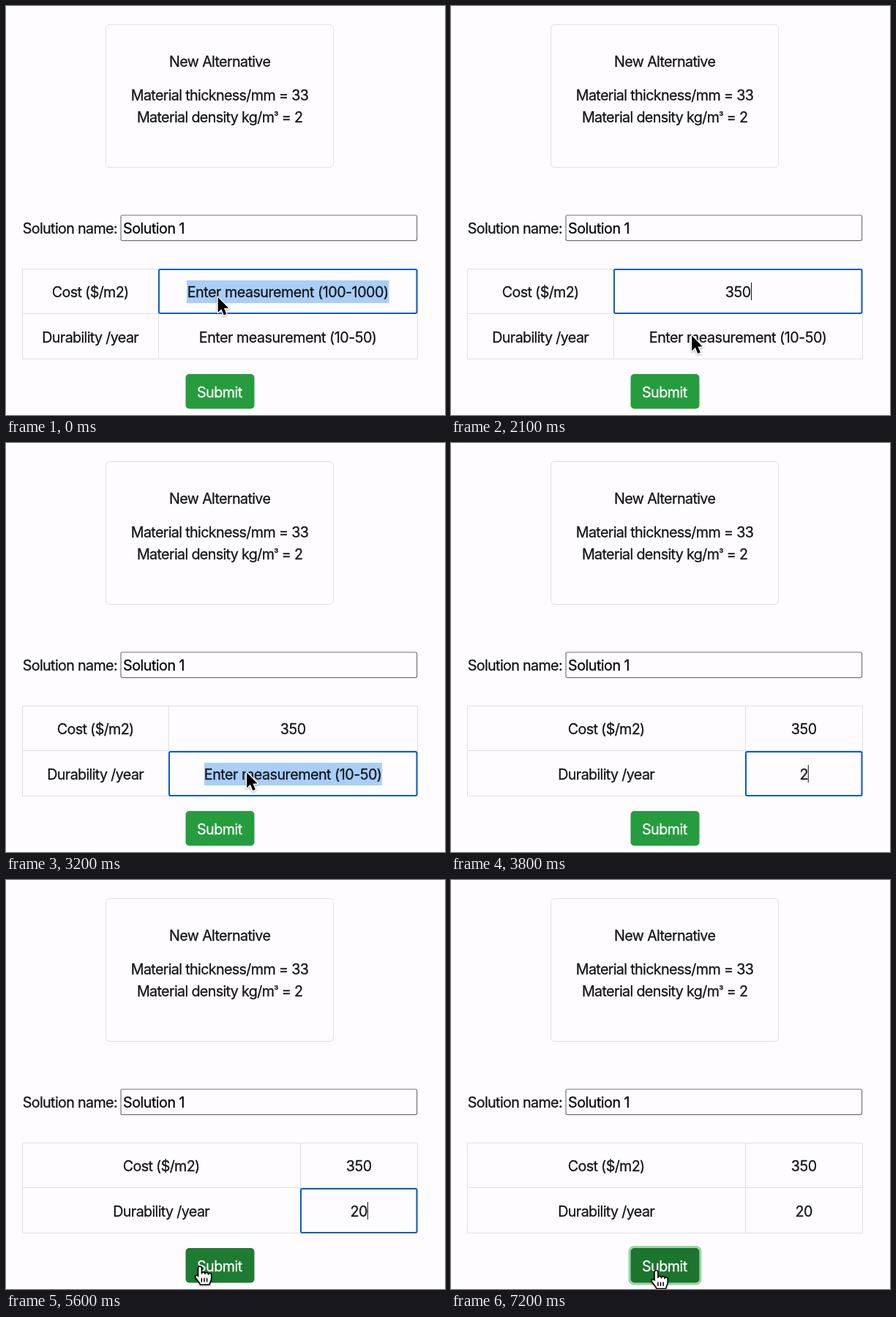
An HTML page that plays this animation: 600 px wide and 559 px high, repeating every 7.3 s.

```html
<!DOCTYPE html>
<html lang="en">
<head>
<meta charset="utf-8">
<title>Measurement form</title>
<style>
  html, body { margin: 0; width: 100%; height: 100%; overflow: hidden; background: #fefcff; }
  svg { display: block; }
  text {
    font: 19.7px Inter, "Liberation Sans", sans-serif;
    font-optical-sizing: none;
    letter-spacing: -0.64px;
    fill: #15161a;
    stroke: #15161a;
    stroke-width: 0.3px;
  }
  .mid { text-anchor: middle; }
  .field { letter-spacing: -0.49px; }
  .line { fill: none; stroke: #dfe0e4; }
  .focus { fill: none; stroke: #0a5dc2; stroke-width: 2; }
  .select { fill: #a9cef8; }
</style>
</head>
<body>
<svg width="600" height="559" viewBox="0 0 600 559">
  <rect class="line" x="136.5" y="25.5" width="311" height="195" rx="5"/>
  <g class="mid">
    <text x="292.2" y="83">New Alternative</text>
    <text x="292" y="128.5">Material thickness/mm = 33</text>
    <text x="292.2" y="159">Material density kg/m<tspan font-size="14" dy="-3" style="font-size:14px">³</tspan><tspan dy="3"> = 2</tspan></text>
  </g>

  <text x="22.8" y="311">Solution name:</text>
  <rect x="157" y="286" width="404.6" height="34.6" rx="2" fill="none" stroke="#747478" stroke-width="1.2"/>
  <text class="field" x="160" y="311" style="fill:#000">Solution 1</text>

  <path class="line" d="M22.5 359.5H562.5V482.5H22.5ZM22.5 420.5H562.5"/>
  <path class="line" id="divider" d="M0 359.5V482.5"/>
  <rect class="select" id="select" height="31"/>
  <g class="mid">
    <text id="label0" y="398">Cost ($/m2)</text>
    <text id="label1" y="460">Durability /year</text>
    <text class="field" id="value0" y="398"></text>
    <text class="field" id="value1" y="460"></text>
  </g>
  <rect class="focus" id="focus" height="60" rx="2"/>
  <rect id="caret" width="1" height="24" fill="#111"/>

  <rect id="ring" x="244" y="501.5" width="97" height="50.5" rx="6" fill="none" stroke="#9ad5a8" stroke-width="3"/>
  <rect id="button" x="245.5" y="503" width="94" height="47.5" rx="5"/>
  <text class="mid field" x="291.8" y="535" style="fill:#fff;stroke:#fff">Submit</text>

  <g id="arrow" stroke-linejoin="round">
    <path d="M0 0V22L5 17.4L8.6 26L12.4 24.4L8.8 16H15.4Z" fill="#000" stroke="#fff" stroke-width="3"
      paint-order="stroke" transform="translate(.7 .5) scale(.94)"
      style="filter:drop-shadow(0 1.5px 1.5px #0005)"/>
  </g>
  <g id="hand" stroke="#000" stroke-width="1.5" stroke-linejoin="round" stroke-linecap="round"
    style="filter:drop-shadow(0 1px 1px #0006)">
    <path fill="#fff" d="M-2.4 14V2.4a2.4 2.4 0 0 1 4.8 0V10a2.3 2.3 0 0 1 4.6 .4a2.2 2.2 0 0 1 4.4 .8a2.1 2.1 0 0 1 4.2 .8V17c0 3-2 4-2.4 8H.5c-.8-3-4-5.5-6.5-9.5a2.2 2.2 0 0 1 3.6-2.5z"/>
    <path fill="none" d="M2.4 16.5V21M6 16.5V21M9.6 16.5V21"/>
  </g>
</svg>
<script>
const LOOP = 7300, STEP = 100, RIGHT = 562.5, LEFT = 22.5;
const $ = id => document.getElementById(id);

// Each track holds [start time, value...] steps; a value stays until the next step.
const tracks = {
  divider: [[0, 208.5], [100, 222.5], [3800, 402.5]],
  value0: [[0, 'Enter measurement (100-1000)'], [100, '3'], [600, '35'], [1100, '350']],
  value1: [[0, 'Enter measurement (10-50)'], [3800, '2'], [4600, '20']],
  focus: [[0, 0], [2300, 1], [7100, -1]],
  select: [[0, 247, 523.5], [100, 0, 0], [2700, 325, 441], [2900, 271, 514], [3800, 0, 0]],
  caret: [[0, 0], [100, 1], [1600, 0], [2100, 1], [2700, 0], [3800, 1], [4300, 0],
    [4600, 1], [5100, 0], [5600, 1], [6100, 0], [6600, 1], [7100, 0]],
  button: [[0, '#259d3e'], [5300, '#218d37'], [5400, '#1d7c31'], [7100, '#1b752d']],
  ring: [[0, 0], [7100, 0.5], [7200, 1]],
  pointer: [[0, 'arrow', 289, 397.5], [100, ''], [1600, 'arrow', 309, 440],
    [1700, 'arrow', 316, 499], [1800, 'arrow', 321, 490], [2000, 'arrow', 326, 462],
    [2100, 'arrow', 328.5, 450], [3800, ''], [5200, 'arrow', 318, 470],
    [5300, 'hand', 300, 508], [5400, 'hand', 276, 531], [5500, 'hand', 267, 531],
    [5600, 'hand', 265, 528], [5900, 'hand', 267, 526], [6000, 'hand', 270, 525.5],
    [6500, 'hand', 274, 526], [6600, 'hand', 277, 528], [7100, 'hand', 280.5, 533.5]]
};

const at = (name, t) => tracks[name].findLast(step => step[0] <= t).slice(1);

function set(id, attrs) {
  for (const key in attrs) $(id).setAttribute(key, attrs[key]);
}

function render(t) {
  const [split] = at('divider', t), [row] = at('focus', t);
  const center = (split + RIGHT) / 2;
  const values = [at('value0', t)[0], at('value1', t)[0]];

  set('divider', { transform: `translate(${split})` });
  values.forEach((value, i) => {
    set('label' + i, { x: (LEFT + split) / 2 - 0.3 });
    set('value' + i, { x: center - 0.3 });
    if ($('value' + i).textContent !== value) $('value' + i).textContent = value;
  });

  const [from, to] = at('select', t);
  set('select', { x: from, width: to - from, y: row === 1 ? 437 : 375 });
  set('focus', { x: split + 0.5, width: RIGHT - split - 1.5, y: row === 1 ? 422 : 360,
    opacity: row < 0 ? 0 : 1 });

  // A click in the untouched cell leaves the caret under the pointer.
  const text = values[Math.max(row, 0)];
  const caretX = text.length > 3 ? 325 : center + 6.1 * text.length - 0.8;
  set('caret', { x: caretX, y: row === 1 ? 440 : 378, opacity: at('caret', t)[0] });

  set('button', { fill: at('button', t)[0] });
  set('ring', { opacity: at('ring', t)[0] });

  const [shape, x, y] = at('pointer', t);
  for (const id of ['arrow', 'hand']) {
    set(id, { display: id === shape ? 'inline' : 'none' });
    if (id === shape) set(id, { transform: `translate(${x} ${y})` });
  }
}

const start = performance.now();
function tick() {
  const t = (performance.now() - start) % LOOP;
  render(Math.floor(t / STEP) * STEP);
  requestAnimationFrame(tick);
}
tick();
</script>
</body>
</html>
```
